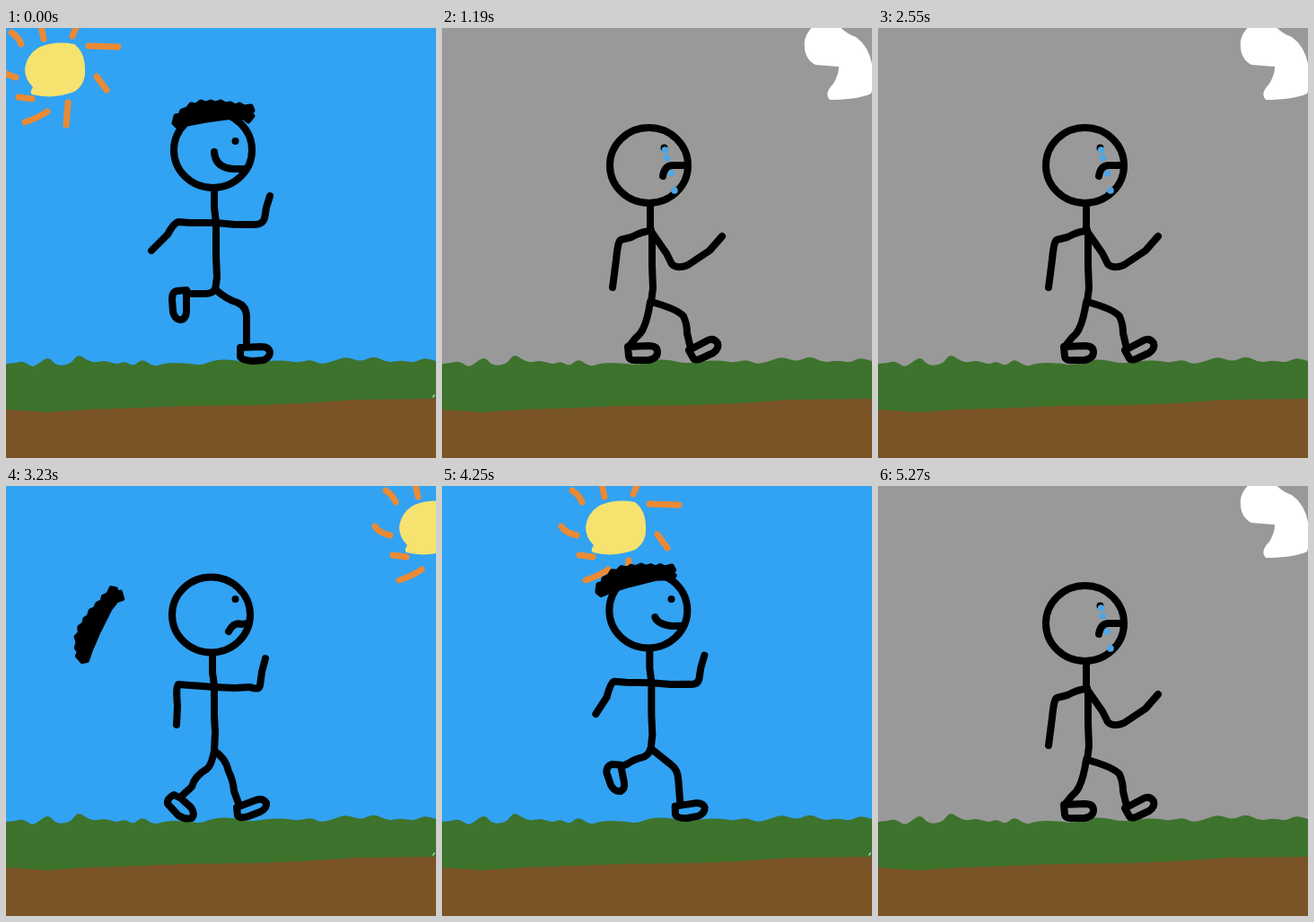
These frames come from a looping animation (479 px wide and 479 px high, 5440 ms). An HTML page:

```html
<!DOCTYPE html>
<html lang="en">
<head>
<meta charset="utf-8">
<title>Runner</title>
<style>
html, body { margin: 0; width: 100%; height: 100%; overflow: hidden; }
svg { display: block; width: 100vw; height: 100vh; }
.line { fill: none; stroke: #000; stroke-width: 8; stroke-linecap: round; stroke-linejoin: round; }
</style>
</head>
<body>
<svg viewBox="0 0 479 479">
  <rect id="sky" width="479" height="479"/>
  <g id="sun">
    <path fill="#f6e26f" d="M21 46Q23 29 38 21Q56 14 76 18Q88 27 88 46Q89 63 76 71Q52 80 29 74Q26 71 30 66Q21 57 21 46Z"/>
    <path fill="none" stroke="#ea8a35" stroke-width="7" stroke-linecap="round" d="M6 5Q14 10 17 18M39 -2L42 12M78 0L74 9M92 20L125 21M101 54L112 69M69 83L67 108M21 105Q36 100 46 93M14 77L29 79M-6 45Q-2 52 11 55"/>
  </g>
  <path id="moon" fill="#fff" d="M404 14Q406 4 416 -4L441 -4Q449 6 461 10Q475 20 479 40Q482 60 478 73Q463 80 432 80Q425 73 436 62Q442 52 442 43L416 41Q402 34 404 14Z"/>
  <path id="grass" fill="#3d732d"/>
  <path fill="#7a5327" d="M0 425L45 428L90 425L150 423L200 421L280 420L330 418L390 414L479 413V479H0Z"/>
  <path id="speck" stroke="#e9f0e4" stroke-width="1.2" d="M475.5 411.5L477.5 408.5"/>
  <g id="figure" class="line"></g>
  <circle id="eye" r="4"/>
  <path id="hat" stroke="#000" stroke-width="5" stroke-linejoin="round" d="M191 110L187 106L189 98L194 97L196 92L202 90L206 85L212 86L217 82L223 84L228 82L233 84L239 82L244 85L250 84L255 87L260 85L265 88L273 87L275 92L272 95L275 98L270 104L265 100L253 99L223 103L202 107Z"/>
  <g id="tears" fill="#4fa6e5"></g>
</svg>
<script>
const STEP = 170;
const byId = id => document.getElementById(id);

// Every pose shares the same path commands, so poses can be blended.
const poses = [
  {
    head: 'M187 136A43.5 42 0 1 1 274 136A43.5 42 0 1 1 187 136Z',
    mouth: 'M232 138Q233 156 254 157L267 157',
    torso: 'M232 180L232 200L234 217L234 255L235 278L233 292',
    backArm: 'M162 248L180 230Q187 217 192 216L205 217Q220 217 234 217',
    frontArm: 'M234 217L255 219L277 219Q286 219 288 212L290 200L294 187',
    backLeg: 'M233 291Q230 296 222 296Q214 296 208 296L202 296',
    backFoot: 'M201 292L190 293Q185 294 185 302L186 316Q188 325 195 325Q201 324 201 314Z',
    frontLeg: 'M233 291Q245 302 258 306Q268 310 268 322L268 353',
    frontFoot: 'M261 356L261 366Q262 370 275 371L287 370Q294 367 294 361Q293 355 284 355Z',
    eye: '255.5 126'
  },
  {
    head: 'M185 143.5A43.5 42 0 1 1 272 143.5A43.5 42 0 1 1 185 143.5Z',
    mouth: 'M248 162Q254 151 262 154L270 153',
    torso: 'M230 186L230 208L232 222L232 255L233 275L232 295',
    backArm: 'M190 266L191 245Q189 222 192 221L205 222Q220 223 232 224',
    frontArm: 'M232 224L255 225L272 224Q282 228 283 222L285 207L289 192',
    backLeg: 'M232 295Q229 311 224 315Q210 323 207 335L195 346',
    backFoot: 'M195 348L187 344Q179 348 180 354L192 367Q200 372 207 370Q211 365 206 358Z',
    frontLeg: 'M232 295Q245 303 248 318Q253 328 254 340L260 356',
    frontFoot: 'M257 358L258 367Q260 371 270 368L283 363Q291 359 290 353Q286 347 278 350Z',
    eye: '255.5 126'
  },
  {
    head: 'M187 153A43.5 42 0 1 1 274 153A43.5 42 0 1 1 187 153Z',
    mouth: 'M246 165Q248 153 257 153L273 153',
    torso: 'M232 196L232 222L234 230L234 265L235 290L233 305',
    backArm: 'M190 289L194 258Q196 237 199 236L211 233Q224 226 233 226',
    frontArm: 'M234 228L250 251L256 263Q262 269 274 264L298 248L312 232',
    backLeg: 'M232 305Q229 325 224 335Q222 340 216 345L208 355',
    backFoot: 'M207 355L208 366Q209 371 218 370L230 370Q240 368 240 361Q240 354 230 354Z',
    frontLeg: 'M233 305Q262 313 269 321Q273 330 273 340L277 357',
    frontFoot: 'M275 359L280 368Q282 371 289 368L302 362Q309 357 307 351Q302 344 294 349Z',
    eye: '247.5 133.5'
  }
];

const NUMBER = /-?\d+(\.\d+)?/g;
function blend(a, b, k) {
  const ends = b.match(NUMBER);
  let i = 0;
  return a.replace(NUMBER, n => +n + (ends[i++] - n) * k);
}

function add(parent, tag, attrs) {
  const node = document.createElementNS('http://www.w3.org/2000/svg', tag);
  for (const key in attrs) node.setAttribute(key, attrs[key]);
  return parent.appendChild(node);
}

const limbs = {};
for (const name in poses[0]) if (name !== 'eye') limbs[name] = add(byId('figure'), 'path', {});

const tears = [[248.5, 136], [250.5, 145], [255.5, 162], [259, 181]]
  .map(([cx, cy]) => add(byId('tears'), 'circle', { cx, cy, r: 3.8 }));

// Grass edge, smoothed through the midpoints.
const edge = [[0, 374], [10, 373], [20, 371], [29, 378], [36, 374], [47, 366], [55, 375],
  [64, 376], [73, 373], [80, 363], [89, 369], [98, 373], [110, 370], [123, 375], [132, 371],
  [142, 377], [152, 368], [165, 378], [176, 373], [200, 373], [218, 376], [230, 370],
  [252, 369], [270, 374], [290, 371], [310, 370], [325, 373], [340, 369], [350, 375],
  [365, 371], [379, 366], [395, 372], [410, 365], [425, 373], [440, 370], [455, 373],
  [465, 367], [479, 371]];
byId('grass').setAttribute('d', 'M0 374' + edge.slice(0, -1).map(([x, y], i) => {
  const [nx, ny] = edge[i + 1];
  return `Q${x} ${y} ${(x + nx) / 2} ${(y + ny) / 2}`;
}).join('') + 'L479 371V430H0Z');

const hatFlight = [0, 0.12, 0.5, 1];

function show(id, visible) {
  byId(id).setAttribute('visibility', visible ? 'visible' : 'hidden');
}

function render(time) {
  const beat = Math.floor(time / STEP) % 8;
  const day = beat < 4;
  const [from, to] = day ? [poses[0], poses[1]] : [poses[1], poses[2]];
  const k = day ? beat / 3 : 0.4 + (beat - 4) * 0.2;

  byId('sky').setAttribute('fill', day ? '#32a2f3' : '#999');
  for (const id of ['sun', 'hat', 'speck']) show(id, day);
  show('moon', !day);
  byId('sun').setAttribute('transform', `translate(${beat * 139})`);
  byId('moon').setAttribute('transform', `translate(${(beat - 7) * 130})`);

  for (const name in limbs) limbs[name].setAttribute('d', blend(from[name], to[name], k));
  const [x, y] = blend(from.eye, to.eye, k).split(' ');
  byId('eye').setAttribute('cx', x);
  byId('eye').setAttribute('cy', y);

  const flight = hatFlight[beat] || 0;
  byId('hat').setAttribute('transform',
    `translate(${-129 * flight} ${57 * flight}) rotate(${-56 * flight} 231 97)`);
  tears.forEach((tear, i) => tear.setAttribute('visibility', beat - 4 >= i ? 'visible' : 'hidden'));
}

const start = performance.now();
function tick() {
  render(performance.now() - start);
  requestAnimationFrame(tick);
}
tick();
</script>
</body>
</html>
```
